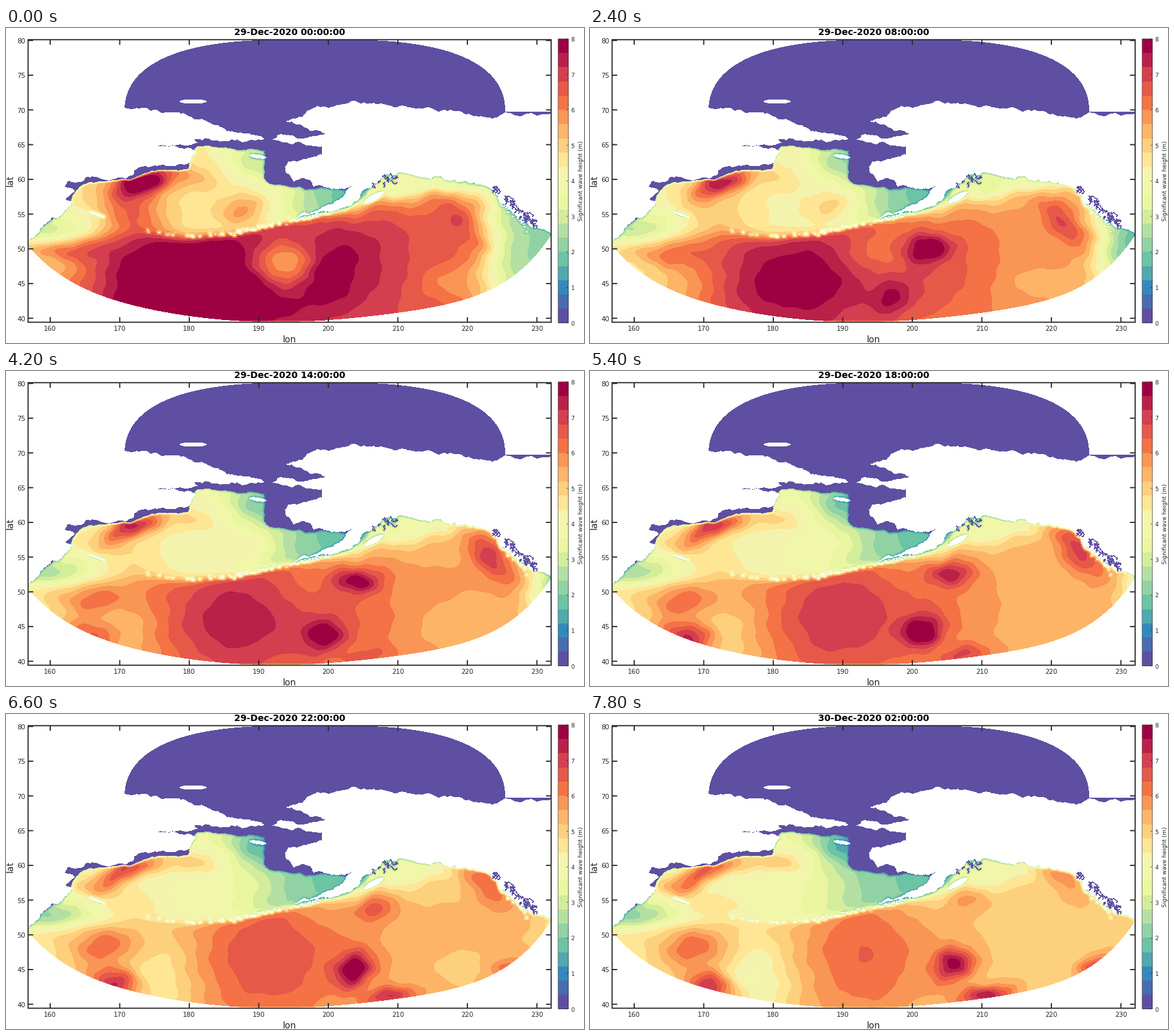
Write a matplotlib script that moves like this. It is 902 px wide and 493 px high and loops after 8000 ms.

```python
import numpy as np
import matplotlib.pyplot as plt
from matplotlib.animation import FuncAnimation
from matplotlib.patches import Rectangle
from matplotlib.path import Path

W, H, DPI = 902, 493, 64
LEFT, RIGHT, TOP, BOTTOM = 35, 851, 18, 461
INK = "#262626"
LEVELS, STEPS = 20, 14

# Coast key points in stage pixels; roughen() adds the detail
SIBERIA = [(10, 126), (190, 126), (262, 132), (315, 147), (345, 162), (385, 167), (403, 174),
           (375, 178), (345, 177), (318, 174), (293, 174), (300, 180), (284, 184), (236, 184),
           (284, 187), (297, 193), (287, 209), (245, 214), (208, 218), (178, 234), (125, 233),
           (96, 240), (92, 249), (108, 255), (93, 268), (104, 272), (86, 294), (72, 296),
           (58, 310), (34, 338), (10, 338)]
ALASKA = [(910, 131), (779, 132), (755, 140), (712, 131), (640, 126), (590, 119), (540, 114),
          (515, 121), (470, 129), (462, 139), (434, 146), (475, 161), (499, 166), (442, 168),
          (411, 175), (446, 182), (493, 185), (493, 198), (460, 207), (440, 209), (437, 227),
          (449, 240), (474, 238), (480, 249), (508, 252), (540, 247), (527, 262), (490, 283),
          (450, 297), (495, 286), (550, 270), (568, 251), (588, 232), (600, 229), (597, 240),
          (612, 226), (650, 234), (700, 237), (757, 252), (788, 286), (808, 301), (820, 312),
          (852, 322), (910, 322)]
ICE = [(10, 322), (58, 311), (97, 281), (108, 256), (122, 244), (180, 236), (250, 222),
       (285, 220), (288, 203), (300, 185), (360, 191), (404, 192), (403, 235), (412, 244),
       (480, 252), (528, 254), (545, 246), (545, 200), (910, 200), (910, 0), (10, 0)]
# cx, cy, half width, half height, slope
ISLANDS = [(292, 115, 21, 3.5, 0), (393, 201, 13, 3, .15), (142, 292, 12, 2, .35),
           (574, 265, 15, 5, -.5)]
CHAIN = [(36, 337), (180, 321), (205, 318), (280, 327), (345, 322), (395, 313), (470, 296),
         (530, 283), (560, 264), (600, 200)]
SOUTH_EDGE = [(36, 343), (105, 399), (200, 434), (300, 453), (420, 460), (520, 456),
              (640, 441), (730, 421), (795, 385), (849, 327)]

rng = np.random.default_rng(7)
X, Y = np.meshgrid(np.arange(LEFT, RIGHT) + .5, np.arange(TOP, BOTTOM) + .5)


def roughen(points, rounds=4, strength=.1):
    """Midpoint displacement along a closed outline."""
    p = np.array(points, float)
    for _ in range(rounds):
        nxt = np.roll(p, -1, axis=0)
        d = nxt - p
        normal = np.column_stack([-d[:, 1], d[:, 0]])
        shift = np.clip(strength * rng.normal(size=(len(p), 1)), -.2, .2)
        mid = (p + nxt) / 2 + shift * np.clip(normal, -25, 25)
        p = np.stack([p, mid], axis=1).reshape(-1, 2)
    return p


def inside(points):
    xy = np.column_stack([X.ravel(), Y.ravel()])
    return Path(points).contains_points(xy).reshape(X.shape)


def paint(mask, x, y, w, h, value):
    r, c = int(y - TOP), int(x - LEFT)
    mask[max(r, 0):r + h, max(c, 0):c + w] = value


def build_domain():
    dome = np.abs((X - 482) / 297) ** 3 + np.abs((131 - Y) / 113.3) ** 2.3 < 1
    kx, ky = np.array(SOUTH_EDGE).T
    edge = np.poly1d(np.polyfit((kx - 440) / 400, ky, 6))((X - 440) / 400)
    return np.where(Y < 131, dome, Y < edge)


def build_masks():
    land = inside(roughen(SIBERIA)) | inside(roughen(ALASKA))
    ice = inside(roughen(ICE, strength=.06))
    for cx, cy, a, b, slope in ISLANDS:
        u, v = X - cx, Y - cy
        land |= (u / a) ** 2 + ((v - slope * u) / b) ** 2 < 1

    # Island chain, denser to the east
    for x in 205 + 300 * rng.random(120) ** .5:
        y = chain_y(x) + rng.normal(0, 1.8)
        paint(land, x, y, rng.integers(2, 6), rng.integers(1, 3), True)
    # Fjords, inlets and skerries
    fjords = [(758 + 66 * t, 247 + 58 * t) for t in rng.random(34)]
    inlets = [(572 + 34 * t, 246 - 16 * t) for t in rng.random(9)]
    for x, y in fjords + inlets:
        x, y = x + rng.normal(0, 3), y + rng.normal(0, 3)
        for _ in range(7):
            paint(land, x, y, 2, 2, False)
            paint(ice, x, y, 2, 2, True)
            x, y = x + rng.choice([-1, 1, 2]), y + rng.choice([-1, 1, 2])
    for t in rng.random(30):
        paint(land, 770 + 45 * t + rng.normal(0, 3), 270 + 45 * t + rng.normal(0, 3), 3, 2, True)
    return build_domain() & ~land, land, ice


def chain_y(x):
    return np.interp(x, *np.array(CHAIN).T)


def shelter(mask, r=3):
    """Share of each pixel's surroundings that is covered by the mask."""
    span = range(-r, r + 1)
    return sum(np.roll(mask, (i, j), (0, 1)).astype(float) for i in span for j in span) / len(span) ** 2


sea, land, ice = build_masks()
wet = sea & ~ice
px, py = X[wet], Y[wet]
near_shore = shelter(land | ice)[wet]
# Gentle warp gives the contours their uneven edges
wx = px + 3 * np.sin(py / 11 + px / 31) + 1.5 * np.sin(py / 5 - px / 13)
wy = py + 3 * np.sin(px / 15 - py / 23) + 1.2 * np.sin(px / 6 + py / 9)


def sigmoid(v):
    return 1 / (1 + np.exp(-np.clip(v, -40, 40)))


def key(t, values):
    """Value at t in 0..1 from evenly spaced keys, or a constant."""
    values = np.atleast_1d(values)
    return np.interp(t, np.linspace(0, 1, len(values)), values)


def bump(t, x, y, amp, size, tilt=0):
    a, b = (key(t, s) for s in size)
    u, v = wx - key(t, x), wy - key(t, y)
    c, s = np.cos(np.radians(tilt)), np.sin(np.radians(tilt))
    return key(t, amp) * np.exp(-.5 * (((u * c + v * s) / a) ** 2 + ((v * c - u * s) / b) ** 2))


def bering(t):
    z = 4.6 - .8 * t - (3 - 1.1 * t) * sigmoid((wx - 455 + 60 * t) / 30)
    z += bump(t, 70, 320, -1.7, (50, 25))                                  # western bay
    z += bump(t, 385, 205, -1.5, (35, 25))                                 # ice edge
    z += bump(t, (200, 195), (285, 300), (1.9, .7, .6, 1), (34, (60, 14)))  # swath
    z += bump(t, (260, 285), (235, 231), (1, .5, .9, 1.4), (55, 14))       # northern band
    z += bump(t, (370, 405), (285, 265), (1.3, .9, .3, 0), (28, 16))
    z += bump(t, 130, 275, (.2, 0, .7, 1.4), (28, 18))
    z += bump(t, (210, 180), (243, 247), (2, 2.6, 2.8, 2.6), (34, 12), -25)  # storm
    return z


def pacific(t):
    z = key(t, (6.6, 5.8, 5.5, 5.0)) * np.ones_like(wx)
    # Main swell, the calm pocket beside it and the calm west and south-west
    z += bump(t, (290, 325, 385, 425), (405, 375), (2.3, 2.1, 1.7, 1.4), ((125, 75), (66, 85)))
    z += bump(t, (435, 480), (370, 330), (-2.2, -.6, 0, 0), (36, 24))
    z += bump(t, 60, 370, (-1.8, -.4), (70, 60))
    z += bump(t, (110, 255), 415, (0, -1.2), (45, 50))
    # Western band and the late storm below it
    z += bump(t, (95, 165), (350, 366), (.9, 1.6), (40, (11, 20)))
    z += bump(t, (70, 190), (390, 428), (0, 0, 2.4, 2.6), (30, 17), 15)
    # Storms crossing the middle
    z += bump(t, (530, 560), (350, 390), (.8, .2), (60, 70))
    z += bump(t, (500, 470, 513, 568), (408, 425, 408, 393), (.4, 1, 2.1, 2.5), (22, 17), -35)
    z += bump(t, (497, 592), (372, 290), (.8, 1.9, 1.8, .8), (24, 14), -5)
    z += bump(t, (510, 618), (455, 440), (0, 0, 1, 2.4), (28, 10), -12)
    # East: calm spot, coastal storm, late swell and the advancing front
    z += bump(t, 695, 398, (-.7, 0), (35, 22))
    z += bump(t, (712, 740, 763, 735), (305, 300, 283, 252), (.6, 1.2, 1.7, .8), (40, 15), 47)
    z += bump(t, (745, 782), (410, 391), (0, 0, 0, 1.7), (20, 8), -35)
    z -= 4.3 * sigmoid((wx - 755 - 150 * t) / 17)
    # Lee of the northern shore
    shore = np.interp(wx, [380, 500, 590, 760], [300, 288, 260, 240])
    lee = np.exp(-np.maximum(wy - shore, 0) / 17)
    reach = np.clip((wx - 430) / 120, 0, 1) * (1 - t * np.clip((wx - 630) / 100, 0, .9))
    return z - (2.8 - 1.4 * t) * lee * reach


soft = np.interp(px, [180, 260, 400], [6, 5, 2.5])
south = sigmoid((py - chain_y(px)) / soft)
colors = plt.get_cmap("Spectral_r")(np.linspace(0, 1, LEVELS))[:, :3]
colors[9] = (.945, .97, .665)
colors[10] = (.96, .955, .685)


def render(t):
    z = bering(t) * (1 - south) + pacific(t) * south
    z *= 1 - .8 * near_shore
    img = np.ones(X.shape + (3,))
    img[sea & ice] = colors[0]
    img[wet] = colors[np.clip(z / .4, 1, LEVELS - 1).astype(int)]
    return img


maps = [render(k / (STEPS - 1)) for k in range(STEPS)]

fig = plt.figure(figsize=(W / DPI, H / DPI), dpi=DPI, facecolor="white")
ax = fig.add_axes([0, 0, 1, 1])
ax.axis("off")
pt = 72 / DPI


def label(x, y, s, size, **kw):
    kw = {"ha": "center", "va": "center", "color": INK, **kw}
    return ax.text(x, y, s, fontsize=size * pt, family="DejaVu Sans", **kw)


def line(x, y, width):
    ax.plot(x, y, color=INK, lw=width * pt, solid_capstyle="butt", zorder=3, snap=False)


def frame_box(x0, y0, x1, y1, width):
    ax.add_patch(Rectangle((x0, y0), x1 - x0, y1 - y0, fill=False, ec=INK, lw=width * pt,
                           zorder=3, snap=False))


picture = ax.imshow(maps[0], extent=(LEFT, RIGHT, BOTTOM, TOP), interpolation="nearest",
                    aspect="auto")
ax.set_xlim(0, W)
ax.set_ylim(H, 0)

x0, x1, y0, y1 = 34.5, 850.7, 18.3, 460.5
frame_box(x0, y0, x1, y1, 1.8)
for lon in range(160, 231, 10):
    x = 69 + 10.85 * (lon - 160)
    line([x, x], [y1, y1 - 8], 1.8)
    line([x, x], [y0, y0 + 8], 1.8)
    label(x, 471, str(lon), 10.2)
for lat in range(40, 81, 5):
    y = 454.3 - 10.87 * (lat - 40)
    line([x0, x0 + 8], [y, y], 1.8)
    line([x1, x1 - 8], [y, y], 1.8)
    label(30, y + .5, str(lat), 10.2, ha="right", va="center_baseline")
label(442.5, 488, "lon", 14)
label(6.5, 239, "lat", 14, rotation=90)
title = label(443, 11, "", 14, weight="bold", color="black", va="baseline")

bar_top, bar_bottom = 17, 461.5
band = (bar_bottom - bar_top) / LEVELS
for i, color in enumerate(colors):
    ax.add_patch(Rectangle((862, bar_bottom - (i + 1) * band), 15.5, band, fc=color, ec="none",
                           antialiased=False))
frame_box(861.7, bar_top, 877.6, bar_bottom, .6)
for v in range(9):
    y = bar_bottom - v * (bar_bottom - bar_top) / 8
    line([874.5, 877.5], [y, y], .6)
    label(881.5, y + .5, str(v), 9, ha="left", va="center_baseline")
label(897, 239.5, "Significant wave height (m)", 9, rotation=90)


def update(frame):
    k = frame // 3
    day, hour = divmod(2 * k, 24)
    picture.set_data(maps[k])
    title.set_text(f"{29 + day}-Dec-2020 {hour:02d}:00:00")
    return picture, title


anim = FuncAnimation(fig, update, frames=40, interval=200, repeat=True, repeat_delay=0)
plt.show()
```
